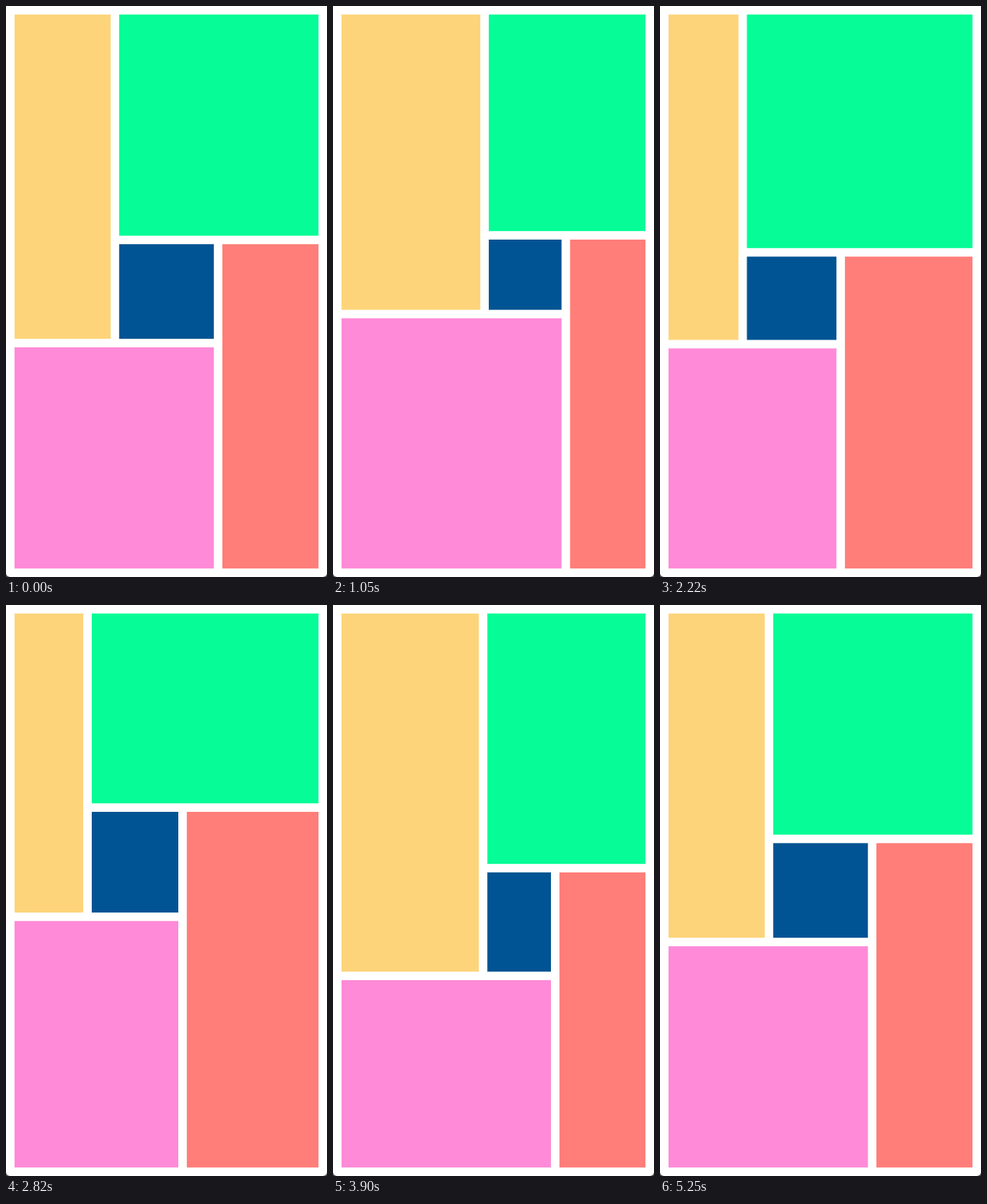
Write an HTML page with a canvas that moves like this. It is 408 px wide and 726 px high and loops after 5280 ms.

```html
<!DOCTYPE html>
<html lang="en">
<head>
<meta charset="utf-8">
<title>Shifting grid</title>
<style>
  html, body { margin: 0; width: 100%; height: 100%; overflow: hidden; background: #444; }
  canvas { display: block; background: #fff; border-radius: 0 0 5px 5px; }
</style>
</head>
<body>
<canvas id="stage" width="408" height="726"></canvas>
<script>
  const LOOP = 5280;
  const GAP = 10.8;
  const { width, height } = document.getElementById("stage");
  const ctx = document.getElementById("stage").getContext("2d");

  // The middle cell alone sets the whole grid: its edges at a few key times.
  const keys = [
    { time: 0, box: [143.8, 302.8, 264.2, 423.2] },
    { time: 1050, box: [198, 297, 290.5, 386.3] },
    { time: 1740, box: [111.5, 358, 228, 448.3] },
    { time: 2820, box: [109, 263, 219, 391] },
    { time: 3900, box: [196.2, 340, 277, 466.2] },
    { time: 4665, box: [166, 295, 277, 396] }
  ];

  const ease = p => (1 - Math.cos(Math.PI * p)) / 2;

  function middleCell(time) {
    const i = keys.findLastIndex(key => key.time <= time);
    const from = keys[i];
    const to = keys[i + 1] || { ...keys[0], time: LOOP };
    const p = ease((time - from.time) / (to.time - from.time));
    return from.box.map((edge, n) => edge + (to.box[n] - edge) * p);
  }

  function cell(color, left, top, right, bottom) {
    ctx.fillStyle = color;
    ctx.fillRect(left, top, right - left, bottom - top);
  }

  function draw(now) {
    const [left, top, right, bottom] = middleCell(now % LOOP);
    const endX = width - GAP;
    const endY = height - GAP;

    ctx.clearRect(0, 0, width, height);
    cell("#fdd47a", GAP, GAP, left - GAP, bottom);
    cell("#05fc96", left, GAP, endX, top - GAP);
    cell("#005493", left, top, right, bottom);
    cell("#ff7e79", right + GAP, top, endX, endY);
    cell("#ff8ad8", GAP, bottom + GAP, right, endY);
    requestAnimationFrame(draw);
  }

  draw(performance.now());
</script>
</body>
</html>
```
